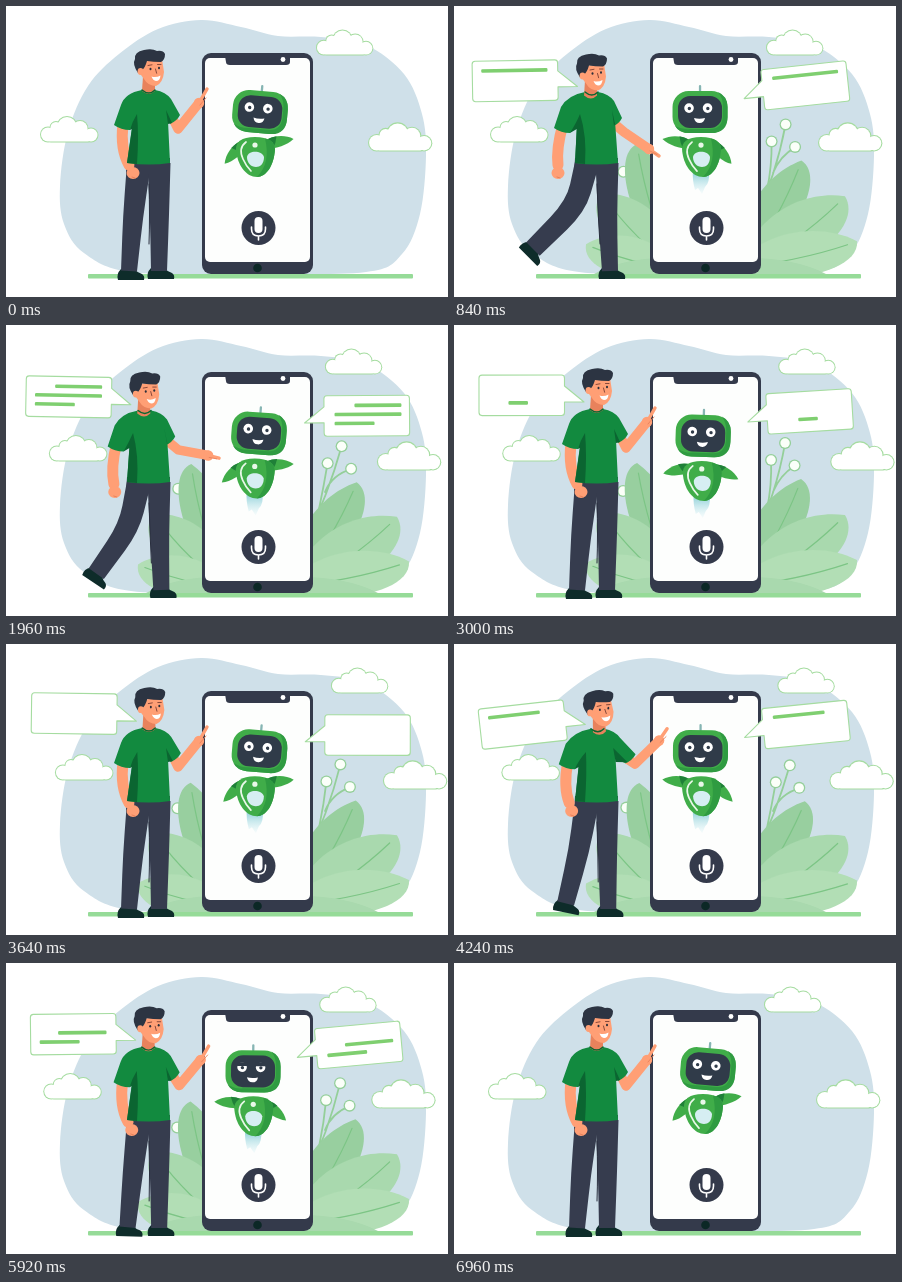
Recreate the animation shown at these times as an HTML page with a canvas. Size 442 by 291 pixels, loop 7000 ms.

```html
<!DOCTYPE html>
<html lang="en">
<head>
<meta charset="utf-8">
<title>Voice assistant</title>
<style>
html, body { margin: 0; width: 100%; height: 100%; overflow: hidden; background: #fff; }
canvas { display: block; width: 442px; height: 291px; }
</style>
</head>
<body>
<canvas id="stage"></canvas>
<script>
const W = 442, H = 291, LOOP = 7000, STEP = 40;
const canvas = document.getElementById('stage');
const g = canvas.getContext('2d');
const dpr = window.devicePixelRatio || 1;
canvas.width = W * dpr;
canvas.height = H * dpr;

const DARK = '#343a4b', SHOE = '#0e2c2a', SKIN = '#ff9f75', SKIN_DARK = '#e8825c';
const SHIRT = '#128a3f', SHIRT_DARK = '#0b6531', LINE = '#7fcf70', EDGE = '#a5dca0';
const PANTS = '#363c4e', BOT = '#40ad49', BOT_DARK = '#1f8038', FACE = '#303b49';

const clamp = x => Math.min(1, Math.max(0, x));
const ease = x => (1 - Math.cos(Math.PI * clamp(x))) / 2;
const mix = (a, b, p) => a + (b - a) * p;
const wave = (t, n) => 2 * Math.PI * n * t / LOOP;

function keyed(keys, t, curve = ease) {
  for (let i = 1; i < keys.length; i++) {
    const [t0, v0] = keys[i - 1], [t1, v1] = keys[i];
    if (t <= t1) return mix(v0, v1, curve((t - t0) / (t1 - t0)));
  }
  return keys[keys.length - 1][1];
}

function fill(d, color) {
  g.fillStyle = color;
  g.fill(new Path2D(d));
}
function stroke(d, color, w) {
  g.strokeStyle = color;
  g.lineWidth = w;
  g.lineCap = g.lineJoin = 'round';
  g.stroke(new Path2D(d));
}
function disc(x, y, r, color, ry = r) {
  g.fillStyle = color;
  g.beginPath();
  g.ellipse(x, y, r, ry, 0, 0, 7);
  g.fill();
}
function box(x, y, w, h, r, color) {
  g.fillStyle = color;
  g.beginPath();
  g.roundRect(x, y, w, h, r);
  g.fill();
}
// Draws in a frame placed at (x, y), turned by deg and scaled by s.
function at(x, y, deg, s, draw) {
  if (s < 0.005) return;
  g.save();
  g.translate(x, y);
  g.rotate(deg * Math.PI / 180);
  g.scale(s, s);
  draw();
  g.restore();
}

function blob() {
  const p = [[54, 180], [62, 126], [82, 80], [113, 48], [152, 23], [195, 14], [235, 21],
    [272, 30], [315, 31], [360, 39], [398, 68], [416, 108], [420, 150], [414, 208],
    [396, 248], [360, 266], [240, 268], [125, 266], [78, 247], [58, 218]];
  const n = p.length;
  g.beginPath();
  g.moveTo(...p[0]);
  for (let i = 0; i < n; i++) {
    const a = p[(i + n - 1) % n], b = p[i], c = p[(i + 1) % n], d = p[(i + 2) % n];
    g.bezierCurveTo(b[0] + (c[0] - a[0]) / 6, b[1] + (c[1] - a[1]) / 6,
      c[0] - (d[0] - b[0]) / 6, c[1] - (d[1] - b[1]) / 6, ...c);
  }
  g.fillStyle = '#cfe0e9';
  g.fill();
}

function cloud(x, y, s) {
  at(x, y, 0, s, () => {
    for (const [grow, color] of [[0, EDGE], [-1, '#fff']]) {
      disc(8, -8, 8 + grow, color);
      disc(16, -15, 6.5 + grow, color);
      disc(27, -16, 10.5 + grow, color);
      disc(40, -14, 8.5 + grow, color);
      disc(51, -7.5, 7.5 + grow, color);
      box(8 + grow / 2, -13, 43, 13 + grow, 3, color);
    }
  });
}

// The sign of bulge picks the fuller side.
function leaf(x, y, tx, ty, bulge, color) {
  const len = Math.hypot(tx - x, ty - y);
  at(x, y, Math.atan2(ty - y, tx - x) * 180 / Math.PI, 1, () => {
    fill(`M0 0C${len * .25} ${-bulge} ${len * .72} ${-bulge} ${len} 0C${len * .97} ${bulge * 1.1} ${len * .3} ${bulge} 0 0Z`, color);
    stroke(`M0 0Q${len * .5} ${bulge * .25} ${len * .92} ${bulge * .05}`, '#7cc585', 1.2);
  });
}
function berry(x, y) {
  disc(x, y, 6, '#94cf99');
  disc(x, y, 4.7, '#fbfff9');
}

function plants(t, show) {
  const sway = 2.5 - 2.5 * Math.sin(wave(t, 3));
  at(251, 268, 0, show, () => {
    g.translate(-251, -268);
    const bx = 331 + sway, by = 118 + sway * .7;
    stroke(`M300 215Q322 170 ${bx} ${by}M313 184Q318 160 ${bx - 14} ${by + 17}M319 167Q326 150 ${bx + 9.5} ${by + 23}`, '#94cf99', 1.8);
    berry(bx, by);
    berry(bx - 14, by + 17);
    berry(bx + 9.5, by + 22.5);
    leaf(290, 262, 347 + sway * .8, 154 + sway * .7, 30, '#98cf9f');
    leaf(286, 268, 391, 190 + sway * .4, 36, '#a9d9ae');
    leaf(280, 262, 403, 235 + sway * .3, 29, '#b2deb5');

    const lx = 169 + sway * .7, ly = 166 - sway * .5;
    stroke(`M204 225Q182 208 ${lx + 2} ${ly}`, '#94cf99', 1.8);
    berry(lx, ly);
    leaf(217, 258, 183 + sway * .5, 138 + sway * .2, -28, '#98cf9f');
    leaf(222, 264, 148, 187 + sway * .4, -32, '#a9d9ae');
    leaf(222, 263, 132, 238 + sway * .3, -26, '#b2deb5');
    fill('M140 268Q180 246 250 254Q330 246 372 268Z', '#a9d9ae');
  });
}

// Three lines are written one by one, then wiped from the left.
function textLines(x, t) {
  const p = t % 3500, each = 470;
  [67, 67, 40].forEach((w, i) => {
    const a = w * clamp((p - 1820 - each * i) / each);
    const b = w * clamp((p - 375 - each * i) / each);
    if (b - a > .5) box(x + a, -19 + i * 9, b - a, 3.6, 1.2, LINE);
  });
}

function bubble(x, y, deg, show, t, side) {
  at(x, y, deg, show, () => {
    const e = side * 19.5, f = side * 105, r = side * 3;
    const d = `M0 0L${e} -16L${e} -24Q${e} -27 ${e + r} -27L${f - r} -27Q${f} -27 ${f} -24
      L${f} 10.5Q${f} 13.5 ${f - r} 13.5L${e + r} 13.5Q${e} 13.5 ${e} 10.5L${e} 0Z`;
    fill(d, '#fff');
    stroke(d, EDGE, 1.1);
    textLines(side < 0 ? -96 : 30, t);
  });
}

function phone() {
  box(196, 47, 111, 221, 9, DARK);
  box(199, 52, 105, 204, 5, '#fdfefd');
  fill('M219 50H284V56Q284 59 280 59H224Q220 59 220 56Z', DARK);
  disc(277, 53.5, 2.4, '#fff');
  disc(251.5, 262, 4.3, '#0c2826');
  disc(252.5, 222, 17, DARK);
  box(248.5, 211, 8, 16, 4, '#fff');
  stroke('M245.5 221V223Q245.5 230 252.5 230Q259.5 230 259.5 223V221M252.5 230V234', '#fff', 1.6);
}

function robot(t, show) {
  const c = -Math.cos(wave(t, 4));
  const bob = 2.6 * (1 - Math.cos(wave(t, 8)));
  const lid = keyed([[5800, 0], [5900, .4], [5960, .4], [6080, 0]], t);

  at(248 - c, 151 + bob, 0, 1, () => {
    at(0, 17, 0, show, () => {
      const jet = g.createLinearGradient(0, 0, 0, 20);
      jet.addColorStop(0, '#9bd5dc');
      jet.addColorStop(1, 'rgba(205,237,243,.15)');
      fill('M-8 -4L8 -4Q9 9 4 13L1 20L-3 14L-6 16Q-9 5 -8 -4Z', jet);
    });
    for (const side of [-1, 1]) {
      at(side * 12, -13, side * 16 + c * 29, 1, () => {
        g.scale(side, 1);
        fill('M0 -4C9 -7 20 -5 27 1C19 6 8 6 0 5Z', BOT);
        fill('M0 -4Q6 -6 11 -5.5Q9 1 5 5.4L0 5Z', BOT_DARK);
      });
    }
    fill('M0 -20C14 -20 20 -15 20 -8C19 9 11 20 2 20C-9 20 -18 8 -19 -8C-19 -15 -14 -20 0 -20Z', BOT);
    fill('M10 -18.5Q20 -16 20 -8C19 9 11 20 2 20Q16 6 10 -18.5Z', '#2f9b41');
    stroke('M-9 -15Q-17 -9 -12 2Q-9 9 -4 14', '#e9f8e9', 1.7);
    fill('M-8 0C-7 -7 7 -7 9 0C9 7 5 10 1 10C-4 10 -8 6 -8 0Z', '#d6eef2');
    disc(0, -12, 2.6, '#e9f8e9');
  });

  at(250 - 4 * c, 106 + bob, 2.5 - 2.5 * c, 1, () => {
    stroke('M0 -21V-26', '#86b5b3', 2.3);
    box(-27.5, -21, 55, 42, 16, BOT);
    fill('M18 -20Q27.5 -16 27.5 -5V5Q27.5 21 11 21H-11Q-21 21 -25 14Q-17 18 -10 17H10Q22 17 23 4V-5Q23 -14 18 -20Z', '#2f9b41');
    box(-22, -16, 44, 32, 12, FACE);
    for (const x of [-11, 7.5]) {
      disc(x, -4, 4.8, '#fff');
      disc(x + .3, -3.6, 1.7, FACE);
      if (lid) {
        g.fillStyle = FACE;
        g.fillRect(x - 5, -9, 10, 9.6 * lid);
      }
    }
    fill('M-6 6Q-1 7.5 5 6Q4 11 -.5 11Q-5 11 -6 6Z', '#fff');
  });
}

// Tapered leg through hip, knee and ankle, each [x, y, halfWidth].
function leg(a, b, c) {
  const side = (p, q, r, s) => {
    const d = Math.hypot(r[0] - q[0], r[1] - q[1]);
    return [p[0] - s * p[2] * (r[1] - q[1]) / d, p[1] + s * p[2] * (r[0] - q[0]) / d];
  };
  const blend = (p, q, k) => [mix(p[0], q[0], k), mix(p[1], q[1], k)];
  const edge = s => {
    const p = side(a, a, b, s), q = side(b, a, c, s), r = side(c, b, c, s);
    return [p, blend(p, q, .6), q, blend(q, r, .4), r];
  };
  const l = edge(1), r = edge(-1);
  fill(`M${l[0]}L${l[1]}Q${l[2]} ${l[3]}L${l[4]}L${r[4]}L${r[3]}Q${r[2]} ${r[1]}L${r[0]}Z`, PANTS);
}
function shoe(x, y, deg) {
  at(x, y, deg, 1, () =>
    fill('M-8 -2L5 -2Q9 2 13 3Q16 5 15 9L-11 9Q-13 3 -8 -2Z', SHOE));
}

// Arm pose along the stride: [stride, elbowX, elbowY, wristX, wristY, tipX, tipY].
const REACH = [
  [0, 172, 123, 193, 97, 201, 83], [.4, 181, 120, 205, 96, 213, 84],
  [.6, 178, 122, 207, 113, 215, 107], [.8, 172, 125, 202, 131, 213, 134],
  [1, 170, 126, 195, 143, 205, 150]];
const reach = (s, i) => keyed(REACH.map(r => [r[0], r[i]]), s, x => x);

function head(dx, dy, tilt) {
  at(143 + dx, 80 + dy, tilt, 1, () => {
    g.translate(-143, -80);
    fill('M137 70L149 74L149 85Q143 91 136 85Z', SKIN_DARK);
    fill('M135 56L156 53L158 66Q157 77 150 80Q142 80 138 73L135 69Z', SKIN);
    fill('M132 67Q126 58 129 53Q128 46 138 44Q146 42 151 45Q157 44 159 48Q159 54 155 56Q147 56 141 55Q139 62 136 64Z', '#2c3442');
    disc(134.5, 65.5, 2.9, SKIN, 3.4);
    disc(144.5, 63, 1, '#2c2f3a', 1.3);
    disc(153, 62, 1, '#2c2f3a', 1.3);
    stroke('M142 59.5L146 58.8M151.5 58.5L155 58.5M149.5 63L150.6 67.2', '#7d4034', .9);
    fill('M145.5 70.5Q150 72 154.5 69.5Q154 75 150 75Q147 74.5 145.5 70.5Z', '#fff');
  });
}

function man(stride, nod) {
  const s = stride;
  const foot = keyed([[0, 0], [.4, .25], [.8, .75], [1, 1]], s, x => x);
  const knee = [mix(127, 122, s), mix(211, 200, s), mix(10, 11, s)];
  const ankle = [mix(123, 79, foot), mix(265, 243, foot), mix(8, 9.5, s)];
  const ax = mix(153, 156, s);
  shoe(ankle[0], ankle[1], 45 * foot);
  shoe(ax, 264, 0);
  leg([133, 157, 12], knee, ankle);
  leg([153, 157, 11.5], [153.5, 210, 9.5], [ax, 265, 8]);
  fill('M121 152H164V168H120Z', PANTS);
  stroke(`M143 178Q144 210 ${143 + s * 3} 238`, '#292e3e', 1);

  // resting arm
  const hx = mix(127, 104, s);
  stroke(`M${mix(117, 109, s)} 118Q${mix(114, 102, s)} 143 ${mix(123, 104, s)} 159`, SKIN, 11);
  disc(hx, 167, 6.5, SKIN, 6);
  stroke(`M${hx - 1} 171L${hx + 2} 172`, SKIN_DARK, 1);

  // pointing arm
  const [ex, ey, wx, wy, tx, ty] = [1, 2, 3, 4, 5, 6].map(i => reach(s, i));
  stroke(`M${164 - 7 * s + 5 * nod} ${107 + 8 * s}L${ex} ${ey}L${wx} ${wy}`, SKIN, 9.5);
  disc(wx, wy, 5.2, SKIN);
  stroke(`M${wx} ${wy}L${tx} ${ty}`, SKIN, 3.4);
  stroke(`M${wx + 1} ${wy + 2}L${mix(wx, tx, .5) + 3} ${mix(wy, ty, .5) + 2}`, SKIN_DARK, .9);

  const dx = -5 * s + 3 * nod, dy = 2 * s, lx = -8 * s, ly = 3 * s, rx = -6 * s + 10 * nod;
  fill(`M${136 + dx} ${84 + dy}Q${119 + dx} ${87 + dy} ${115 + lx} ${99 + dy}
    L${108 + lx} ${119 + ly}Q${115 + lx} ${124 + ly} ${124 + lx} ${124 + ly}
    L${126 + lx * .4} 121L121 157Q143 160 164 157L${162 - s} 115L${164 + rx} ${118 + ly}
    Q${171 + rx} ${115 + ly} ${174 + rx} ${109 + ly}L${165 + dx} ${93 + dy}
    Q${160 + dx} ${86 + dy} ${149 + dx} ${84 + dy}Q${142 + dx} ${89 + dy} ${136 + dx} ${84 + dy}Z`, SHIRT);
  fill(`M${131 + dx} 108Q${126 + lx * .4} 116 ${124 + lx} ${124 + ly}L${126 + lx * .4} 123
    L121 157L131 158Q133 130 ${131 + dx} 108Z`, SHIRT_DARK);
  fill(`M${160 - 2 * s} 104L${162 - s} 118L${166 + rx} ${117 + ly}Z`, SHIRT_DARK);
  head(-6 * s + 5 * nod, 4.5 * s + nod, -4 * nod);
  stroke(`M${136 + dx} ${84 + dy}Q${143 + dx} ${90 + dy} ${149 + dx} ${84 + dy}`, SHIRT_DARK, 1.4);
}

function draw(t) {
  g.setTransform(dpr, 0, 0, dpr, 0, 0);
  g.fillStyle = '#fff';
  g.fillRect(0, 0, W, H);

  const drift = 7.5 * (1 - Math.cos(wave(t, 1)));
  const rock = -Math.cos(wave(t, 4));
  const bob = 1.3 * (1 - Math.cos(wave(t, 8)));
  const show = keyed([[0, 0], [600, 1], [6350, 1], [6900, 0]], t);
  const stride = keyed([[0, 0], [800, 1], [1600, 1], [2800, 0], [3800, 0], [4800, 1], [4900, 1], [6100, 0]], t);
  const nod = keyed([[3500, 0], [4240, 1], [5000, 0]], t);

  blob();
  cloud(34 + drift, 136.5, 1);
  cloud(362 + drift, 145.5, 1.1);
  cloud(310 + drift, 49.5, .98);
  plants(t, show);
  box(82, 268, 325, 4.5, 1, '#96db98');
  bubble(130 - 6.5 * stride + 4 * nod, 77 + 3.5 * stride + 2 * nod, .2 - 1.2 * rock - 5.5 * nod, show, t, -1);
  phone();
  robot(t, show);
  bubble(295 - 4.9 * rock, 95 - 2.4 * rock + bob, -2.8 - 3.3 * rock, show, t, 1);
  man(stride, nod);
}

const start = performance.now();
function tick() {
  const t = (performance.now() - start) % LOOP;
  draw(Math.floor(t / STEP) * STEP);
  requestAnimationFrame(tick);
}
tick();
</script>
</body>
</html>
```
